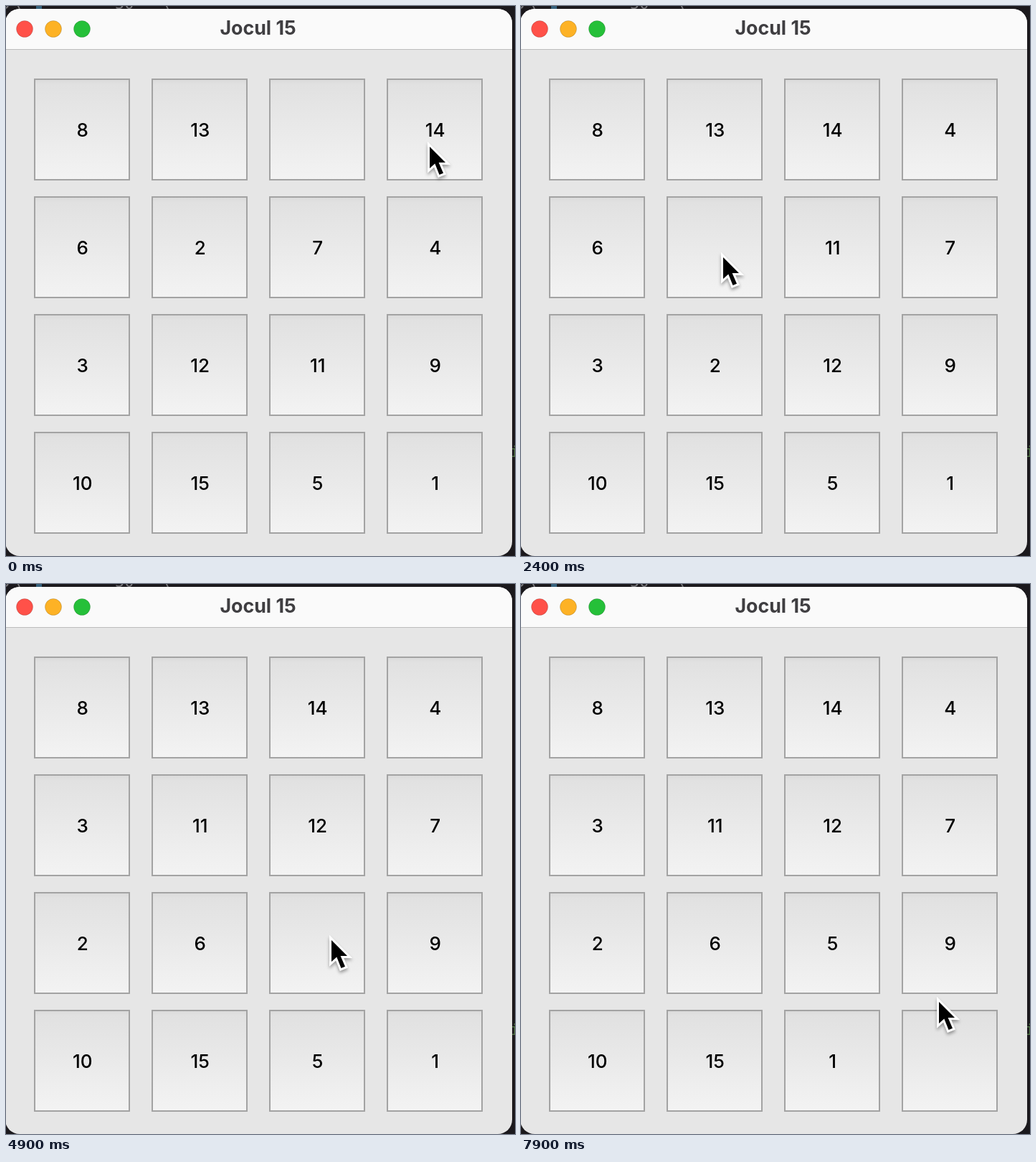
Recreate the animation shown at these times as an HTML page. Size 710 by 766 pixels, loop 8000 ms.

```html
<!DOCTYPE html>
<html lang="ro">
<head>
<meta charset="utf-8">
<title>Jocul 15</title>
<style>
  html, body { margin: 0; width: 100%; height: 100%; overflow: hidden; background: #1b191d; }
  svg { display: block; width: 710px; height: 766px; }
  .label { font: 500 26px Inter, "Open Sans", sans-serif; text-anchor: middle; }
  .title { font: 700 26.75px Inter, "Open Sans", sans-serif; text-anchor: middle; fill: #3f3e41; }
  .code { font: 22px "DejaVu Sans Mono", monospace; fill: #77767a; }
  .tile { stroke: #a3a3a3; stroke-width: 2; }
  .cursor { stroke: #fff; stroke-width: 6; stroke-miterlimit: 8; paint-order: stroke;
    filter: drop-shadow(0 3px 2px rgba(0, 0, 0, .35)); }
</style>
</head>
<body>
<svg viewBox="0 0 710 766">
  <defs>
    <linearGradient id="up" x2="0" y2="1">
      <stop stop-color="#dadada"/><stop offset=".05" stop-color="#e1e1e1"/>
      <stop offset="1" stop-color="#f3f3f3"/>
    </linearGradient>
    <linearGradient id="down" x2="0" y2="1">
      <stop stop-color="#a5a5a5"/><stop offset="1" stop-color="#b9b9b9"/>
    </linearGradient>
    <clipPath id="frame"><rect x="-1" y="4" width="707" height="762" rx="20"/></clipPath>
  </defs>

  <!-- editor text peeking out behind the window -->
  <g class="code">
    <text x="-8" y="4">3</text><text x="9" y="4">\</text>
    <text x="152" y="4">50</text><text x="216" y="4">\</text>
    <rect x="42" width="8" height="4" fill="#36617c"/>
    <text x="703" y="628" fill="#4f7345">i</text>
  </g>

  <g clip-path="url(#frame)">
    <rect x="-1" width="707" height="766" fill="#e6e6e6"/>
    <rect x="-1" width="707" height="60" fill="#fafafa"/>
    <rect x="-1" y="60" width="707" height="1" fill="#bdbdbd"/>
    <g stroke-opacity=".16" stroke="#000">
      <circle cx="26" cy="32" r="11.5" fill="#ff5149"/>
      <circle cx="66" cy="32" r="11.5" fill="#fdb225"/>
      <circle cx="106" cy="32" r="11.5" fill="#25c039"/>
    </g>
    <text class="title" x="351.5" y="40">Jocul 15</text>
    <g id="grid"></g>
  </g>
  <path id="cursor" class="cursor" d="M3 7V37L10.3 30.5L16.5 46L22 43.8L15.6 29H25Z"/>
</svg>
<script>
const LOOP = 8000, STEP = 100, PITCH = 164;
const START = [8, 13, 0, 14, 6, 2, 7, 4, 3, 12, 11, 9, 10, 15, 5, 1];

// time and number of each clicked tile
const CLICKS = [
  [200, 14], [600, 4], [1000, 7], [1500, 11], [1900, 12], [2200, 2], [2700, 6], [3000, 3],
  [3400, 2], [3800, 6], [4400, 11], [4800, 12], [5500, 6], [6300, 6], [6600, 5], [7400, 1]
];
// places the pointer wanders through between clicks
const STRAYS = [
  [0, 588, 189], [2400, 279, 343], [4000, 269, 399], [5900, 282, 653],
  [6100, 497, 560], [7000, 471, 688], [7900, 580, 575]
].map(([t, x, y]) => ({ t, x, y }));

const centre = i => ({ x: 106 + (i % 4) * PITCH, y: 172 + (i >> 2) * PITCH });

function slide(board, value) {
  const from = board.indexOf(value), gap = board.indexOf(0);
  board[gap] = value;
  board[from] = 0;
  return from;
}

// The pointer rests on each clicked tile while the button is held.
function planPath() {
  const board = START.slice();
  const stops = CLICKS.flatMap(([t, value]) => {
    const c = centre(slide(board, value)), x = c.x + 17, y = c.y - 11;
    return [{ t, x, y }, { t: t + STEP, x, y }];
  });
  return stops.concat(STRAYS).sort((a, b) => a.t - b.t);
}

const path = planPath();
const grid = document.getElementById("grid");
const cursor = document.getElementById("cursor");

function add(name, attrs) {
  const node = document.createElementNS("http://www.w3.org/2000/svg", name);
  for (const key in attrs) node.setAttribute(key, attrs[key]);
  return grid.appendChild(node);
}

const tiles = START.map((_, i) => {
  const { x, y } = centre(i);
  return {
    box: add("rect", { class: "tile", x: x - 66, y: y - 70, width: 132, height: 140 }),
    label: add("text", { class: "label", x: x + 0.7, y: y + 10 })
  };
});

function pointerAt(t) {
  const next = path.findIndex(p => p.t > t);
  const b = path[next] || path[path.length - 1];
  if (next < 0) return [b.x, b.y];
  const a = path[next - 1];
  const u = (t - a.t) / (b.t - a.t), ease = u * u * (3 - 2 * u);
  return [a.x + (b.x - a.x) * ease, a.y + (b.y - a.y) * ease];
}

function draw(t) {
  const board = START.slice();
  let pressed = -1;
  for (const [time, value] of CLICKS) {
    if (t >= time + STEP) slide(board, value);
    else if (t >= time) pressed = board.indexOf(value);
  }
  tiles.forEach(({ box, label }, i) => {
    box.setAttribute("fill", i === pressed ? "url(#down)" : "url(#up)");
    label.textContent = board[i] || "";
  });
  cursor.setAttribute("transform", `translate(${pointerAt(t)})`);
}

const began = performance.now();
function tick() {
  const t = (performance.now() - began) % LOOP;
  draw(Math.floor(t / STEP) * STEP);
  requestAnimationFrame(tick);
}
tick();
</script>
</body>
</html>
```
